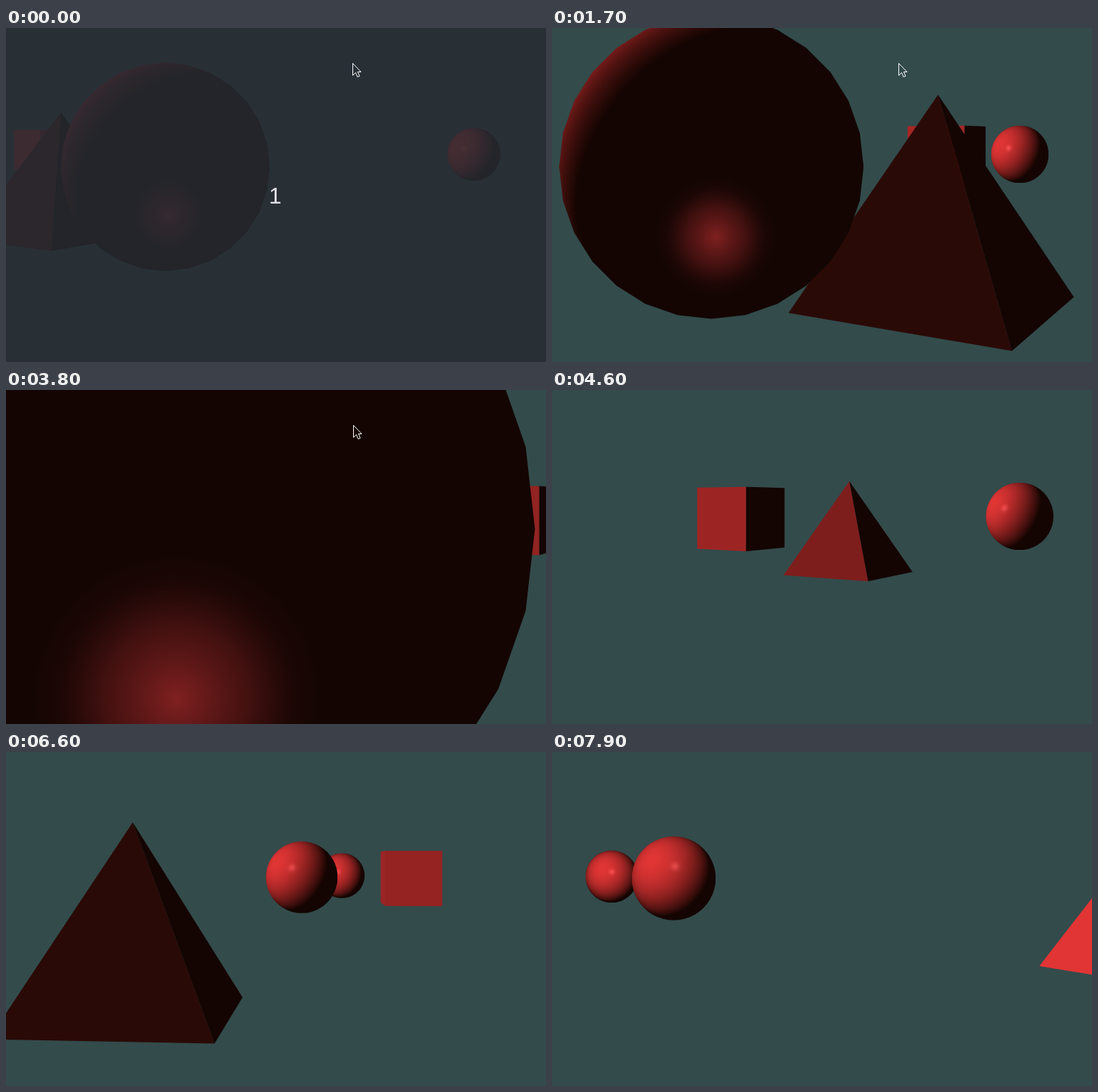
Recreate the animation shown at these times as an HTML page with a canvas. Size 756 by 468 pixels, loop 8000 ms.

```html
<!DOCTYPE html>
<html>
<head>
<meta charset="utf-8">
<style>
html, body { margin: 0; width: 100%; height: 100%; overflow: hidden; background: #334b4b }
canvas { display: block }
</style>
</head>
<body>
<canvas id="stage" width="756" height="468"></canvas>
<script>
const ctx = document.getElementById('stage').getContext('2d');
const TAU = Math.PI * 2, RAD = Math.PI / 180;
const FOCAL = 950, MID = 378, HORIZON = 154.6;
const RADIUS = .695, TOP = -.262, GROUND = 1;

// World coordinates are relative to the point the camera circles; y points down.
const EYE = { x: -.4, y: 0, z: -6.66 };     // starting viewpoint
const LIGHT = { x: -8, y: -5, z: 4 };
const SPIN = .06 * RAD;                     // orbit speed per ms
let yaw = 0;

const clamp = v => Math.min(1, Math.max(0, v));

function turn(x, z) {
  const c = Math.cos(yaw), s = Math.sin(yaw);
  return { x: x * c - z * s, z: x * s + z * c };
}
function view(x, z) {
  const p = turn(x, z);
  return { x: p.x - EYE.x, z: p.z - EYE.z };
}
function project(x, y, z) {
  const p = view(x, z);
  return [MID + FOCAL * p.x / p.z, HORIZON + FOCAL * y / p.z];
}
function unit(x, y, z) {
  const d = Math.hypot(x, y, z);
  return { x: x / d, y: y / d, z: z / d };
}
const toward = (p, x, y, z) => unit(p.x - x, p.y - y, p.z - z);
const dot = (a, b) => a.x * b.x + a.y * b.y + a.z * b.z;
const shade = (d, s = 0) => [20 + 205 * d + 40 * s, 5 + 48 * d + 30 * s, 2 + 51 * d + 30 * s];

function trace(points) {
  ctx.beginPath();
  points.forEach(p => ctx.lineTo(p[0], p[1]));
  ctx.closePath();
}

// Cube or pyramid standing on the ground, drawn as its visible sides.
function solid(radius, angle, pointed) {
  const x = radius * Math.cos(angle), z = radius * Math.sin(angle);
  const ring = y => [0, 1, 2, 3].map(k => {
    const a = (192.4 + 90 * k) * RAD;
    return project(x + .91 * Math.cos(a), y, z + .91 * Math.sin(a));
  });
  const draw = () => {
    const base = ring(GROUND), top = pointed ? Array(4).fill(project(x, TOP, z)) : ring(TOP);
    const out = pointed ? .32 : .64, mid = pointed ? .58 : .37;
    for (let k = 0; k < 4; k++) {
      const n = (k + 1) % 4, a = base[k], b = base[n], c = top[n];
      if ((b[0] - a[0]) * (c[1] - a[1]) > (b[1] - a[1]) * (c[0] - a[0])) continue;
      const face = (237.4 + 90 * k) * RAD, nx = Math.cos(face), nz = Math.sin(face);
      const normal = unit(nx, pointed ? -.51 : 0, nz);
      const d = clamp(dot(normal, toward(LIGHT, x + out * nx, mid, z + out * nz)));
      trace([a, b, c, top[k]]);
      ctx.fillStyle = `rgb(${shade(d)})`;
      ctx.fill();
    }
  };
  return { depth: view(x, z).z, draw };
}

// Shaded disc, computed in a small buffer and scaled to size.
const SIZE = 128;
const buffer = document.createElement('canvas');
buffer.width = buffer.height = SIZE;
const bufferCtx = buffer.getContext('2d');
const image = bufferCtx.createImageData(SIZE, SIZE);

function shadeDisc(light, half, spread, gloss) {
  for (let j = 0, i = 0; j < SIZE; j++) {
    for (let k = 0; k < SIZE; k++, i += 4) {
      let x = (k + .5) * 2 / SIZE - 1, y = (j + .5) * 2 / SIZE - 1;
      const fit = spread / Math.max(1, Math.hypot(x, y));
      x *= fit;
      y *= fit;
      const n = { x, y, z: Math.sqrt(Math.max(0, 1 - x * x - y * y)) };
      const d = clamp(dot(n, light));
      const s = d > 0 ? gloss * clamp(dot(n, half)) ** 200 : 0;
      image.data.set([...shade(d, s), 255], i);
    }
  }
  bufferCtx.putImageData(image, 0, 0);
}

// Balls travel along a ray toward the starting viewpoint.
function ball(kx, ky, dist, glow) {
  const x = kx * dist + EYE.x, y = ky * dist, z = dist + EYE.z, p = view(x, z);
  const draw = () => {
    const spread = Math.sqrt(1 - (RADIUS / p.z) ** 2);
    const r = FOCAL * RADIUS / p.z / spread, side = Math.atan2(p.x, p.z);
    const facing = v => {
      const q = turn(v.x, v.z), c = Math.cos(side), s = Math.sin(side);
      return { x: q.x * c - q.z * s, y: v.y, z: -q.x * s - q.z * c };
    };
    const l = toward(LIGHT, x, y, z), e = toward(EYE, x, y, z);
    shadeDisc(facing(l), facing(unit(l.x + e.x, l.y + e.y, l.z + e.z)), spread, glow ? 0 : 1);

    const sides = glow ? 28 : 48;
    ctx.save();
    ctx.translate(...project(x, y, z));
    ctx.scale(r, r);
    trace(Array.from({ length: sides }, (_, i) =>
      [Math.cos(i * TAU / sides), Math.sin(i * TAU / sides)]));
    ctx.clip();
    ctx.drawImage(buffer, -1, -1, 2, 2);
    if (glow) {
      const g = ctx.createRadialGradient(.03, .46, 0, .03, .46, .4);
      g.addColorStop(0, 'rgb(128,32,32)');
      g.addColorStop(.5, 'rgba(110,28,28,.5)');
      g.addColorStop(.8, 'rgba(90,22,26,.1)');
      g.addColorStop(1, 'rgba(90,22,26,0)');
      ctx.fillStyle = g;
      ctx.fillRect(-1, -1, 2, 2);
    }
    ctx.restore();
  };
  return { depth: p.z, draw };
}

function cursor(x, y) {
  trace([[0, 0], [0, 17], [4, 13], [6.5, 19], [9.5, 18], [7, 12], [11.5, 12]]
    .map(p => [x + p[0], y + p[1]]));
  ctx.strokeStyle = '#fff';
  ctx.lineWidth = 1;
  ctx.stroke();
}

function render(t) {
  // A first drag, a pause, then a speeding drag around the scene.
  yaw = (21.4 * clamp((t - 4600) / 800) + 8.8 * Math.max(0, t / 1000 - 5.7) ** 2) * RAD;
  ctx.fillStyle = '#334b4b';
  ctx.fillRect(0, 0, 756, 468);

  const things = [
    solid(2.6, 174.5 * RAD + SPIN * t, true),
    ...[[8.5, -28], [7.8, -170.6], [9.9, 9], [17.2, 117.3]]
      .map(([radius, start]) => solid(radius, start * RAD + SPIN * t, false)),
    ball(.2916, .0236, 17.8 - .00083 * t, false),
    ball(.47, .0223, 25.4 - .00106 * t, false)
  ];
  if (t < 4350) things.push(ball(-.163, .042, 4.57 - .00082 * t, true));
  things.filter(o => o.depth > .9).sort((a, b) => b.depth - a.depth).forEach(o => o.draw());

  // Countdown veil
  const veil = clamp((700 - t) / 600);
  if (veil > 0) {
    ctx.fillStyle = `rgba(39,43,51,${.84 * veil})`;
    ctx.fillRect(0, 0, 756, 468);
    ctx.fillStyle = `rgba(225,225,230,${veil})`;
    ctx.font = '32px "Liberation Sans", Arial, sans-serif';
    ctx.textAlign = 'center';
    ctx.fillText('1', 377, 246);
  }
  if (t < 4500) cursor(t < 2500 ? 485.5 : 486.5, 49.5);
}

function frame() {
  render(performance.now() % 8000);
  requestAnimationFrame(frame);
}
frame();
</script>
</body>
</html>
```
